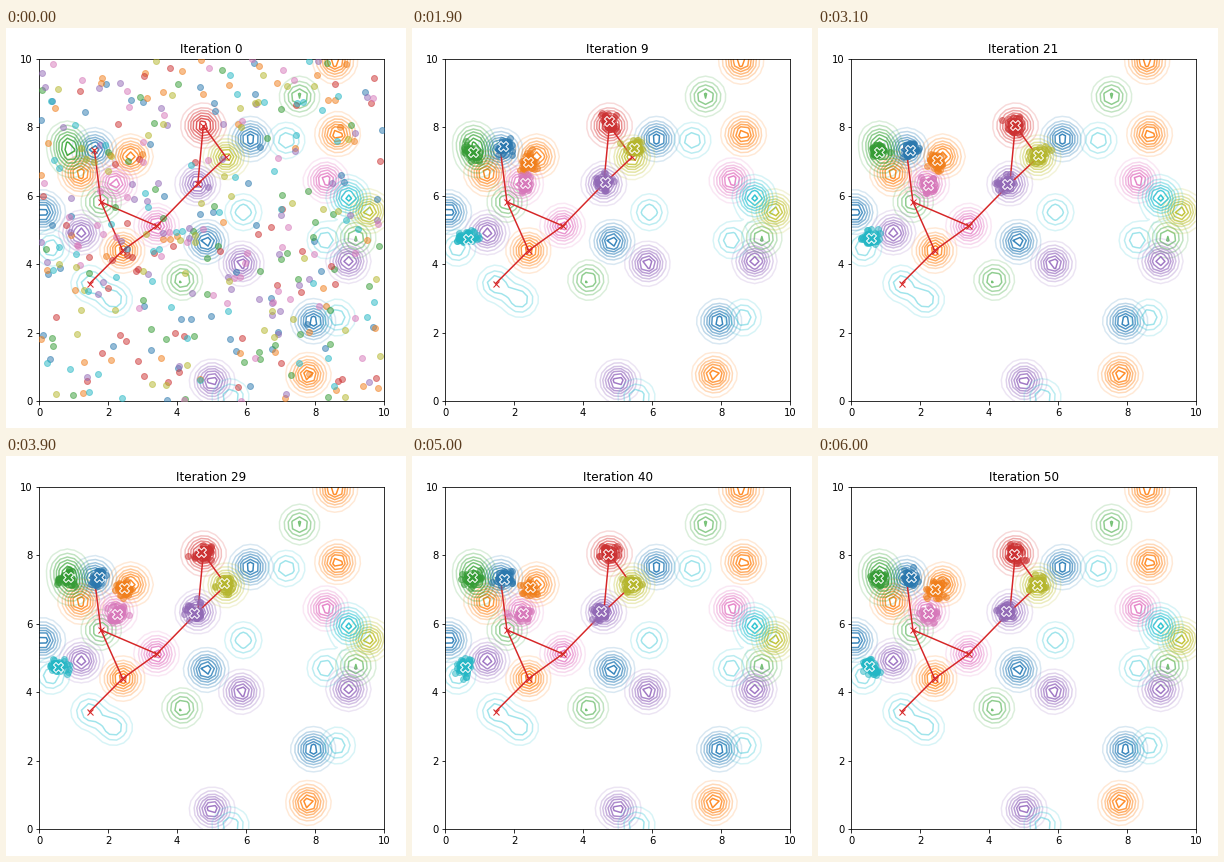
Animation of 400 by 400 pixels, one loop 7100 ms. Source, as a matplotlib script:

```python
import matplotlib.pyplot as plt
import numpy as np
from matplotlib.animation import FuncAnimation
from matplotlib.colors import LinearSegmentedColormap, to_rgba

SIZE, DPI = 400, 72
STEPS, HOLD = 50, 10          # iterations, extra ticks at each end
COUNT = 50                    # particles per group
VARIANCE = 0.1                # of each landmark's density

# The first landmark of every colour lies on the route.
LANDMARKS = {
    "blue": [(1.6, 7.34), (6.13, 7.66), (0.1, 5.52), (4.85, 4.66), (7.95, 2.33)],
    "orange": [(2.42, 4.4), (2.65, 7.15), (1.2, 6.65), (8.65, 7.8),
               (8.58, 9.93), (7.8, 0.77)],
    "green": [(1.79, 5.82), (0.82, 7.6), (0.93, 7.12), (7.55, 8.9),
              (4.15, 3.54), (9.18, 4.77)],
    "red": [(4.76, 8.05)],
    "purple": [(4.6, 6.35), (1.22, 4.92), (5.87, 4.02), (8.97, 4.09), (5.02, 0.58)],
    "pink": [(3.41, 5.12), (2.2, 6.36), (8.32, 6.45)],
    "olive": [(5.42, 7.13), (9.55, 5.54)],
    "cyan": [(1.46, 3.43), (8.93, 6.03), (9.02, 5.85), (7.17, 7.62), (5.92, 5.52),
             (0.35, 4.48), (2.17, 2.97), (8.3, 4.7), (8.64, 2.44), (5.55, 0.12)],
}
ROUTE = ["cyan orange pink purple olive red purple", "orange green pink", "blue green"]

# Where each group's estimate starts and where it settles.
TRACKS = {
    "blue": [(1.70, 7.75), (1.71, 7.35)],
    "orange": [(2.31, 6.76), (2.45, 7.03)],
    "green": [(0.74, 7.05), (0.78, 7.33)],
    "red": [(4.86, 8.64), (4.74, 8.06)],
    "purple": [(5.15, 6.52), (4.50, 6.35)],
    "pink": [(2.48, 6.63), (2.25, 6.29)],
    "olive": [(5.93, 8.45), (5.40, 7.16)],
    "cyan": [(1.00, 4.73), (0.54, 4.75)],
}


def tab(name):
    return "tab:" + name


def muted(name, grey=0.12):
    return (1 - grey) * np.array(to_rgba(tab(name))[:3]) + grey * 0.5


def simulate(name, rng):
    """Particles and estimate of one group for every iteration."""
    start, home = np.array(TRACKS[name])
    clouds, estimates = [rng.uniform(0, 10, (COUNT, 2))], [home]
    # The first resampling leaves one big clump and a few smaller ones.
    clumps = rng.normal(0, 0.6, (COUNT, 2))
    clumps[0] = 0
    lag = clumps[rng.geometric(0.6, COUNT) - 1]
    wander = np.zeros((COUNT, 2))
    for k in range(1, STEPS + 1):
        centre = home + (start - home) * np.exp(-(k - 1) / 5)
        jitter = rng.normal(0, 0.02, 2) * (k > 1)
        if k > 1:
            weights = np.exp(-2 * (lag ** 2).sum(axis=1))
            parents = rng.choice(COUNT, COUNT, p=weights / weights.sum())
            lag = 0.9 * lag[parents]
            wander = 0.9 * wander[parents] + rng.normal(0, 0.055, (COUNT, 2))
            wander -= 0.5 * wander.mean(axis=0)
        clouds.append(centre + lag + wander)
        estimates.append(centre + jitter)
    return clouds, estimates


def draw_landmarks(ax):
    axis = np.linspace(0, 10, 50)
    x, y = np.meshgrid(axis, axis)
    for name, spots in LANDMARKS.items():
        density = sum(np.exp(-((x - a) ** 2 + (y - b) ** 2) / (2 * VARIANCE))
                      for a, b in spots) / (2 * np.pi * VARIANCE)
        fade = LinearSegmentedColormap.from_list(
            name, [to_rgba(tab(name), 0.05), to_rgba(tab(name), 1)])
        ax.contour(x, y, density, cmap=fade)


def draw_route(ax):
    for stroke in ROUTE:
        nodes = np.array([LANDMARKS[name][0] for name in stroke.split()])
        ax.plot(*nodes.T, color=tab("red"))
    ax.plot(*np.array([spots[0] for spots in LANDMARKS.values()]).T, "x",
            color=tab("red"))


plt.rcParams["font.family"] = "DejaVu Sans"
fig = plt.figure(figsize=(SIZE / DPI, SIZE / DPI), dpi=DPI)
ax = fig.add_axes([33.2 / SIZE, 27 / SIZE, 344.8 / SIZE, 342 / SIZE])
draw_landmarks(ax)
draw_route(ax)
ax.set(xlim=(0, 10), ylim=(0, 10), xticks=range(0, 11, 2), yticks=range(0, 11, 2))
title = ax.set_title("Iteration 0")

rng = np.random.default_rng(7)
groups = []
for name in TRACKS:
    dots = ax.scatter([], [], s=36, color=muted(name), alpha=0.5, zorder=3)
    cross = ax.scatter([], [], s=100, marker="X", color=muted(name),
                       edgecolors="white", linewidths=1, zorder=4)
    groups.append((dots, cross, *simulate(name, rng)))


def update(frame):
    k = min(max(frame - HOLD, 0), STEPS)
    title.set_text(f"Iteration {k}")
    for dots, cross, clouds, estimates in groups:
        dots.set_offsets(clouds[k])
        cross.set_offsets([estimates[k]])
        cross.set_visible(k > 0)


anim = FuncAnimation(fig, update, frames=STEPS + 2 * HOLD + 1, interval=100,
                     init_func=lambda: update(0), repeat=True, repeat_delay=0, blit=False)
plt.show()
```
